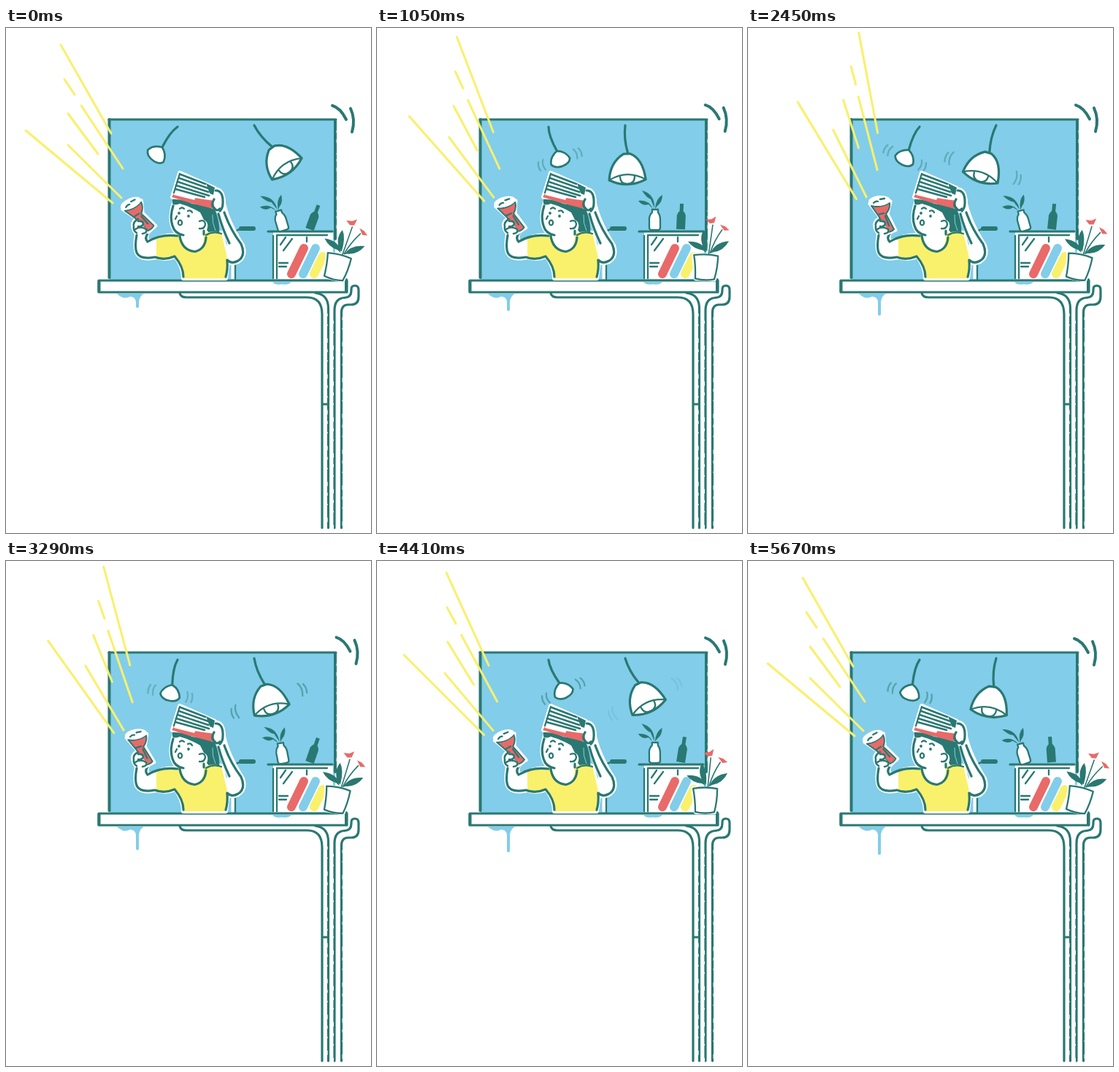
These frames come from a looping animation (500 by 690 pixels, 5.74 s). An HTML page:

```html
<!DOCTYPE html>
<html lang="en">
<head>
<meta charset="utf-8">
<title>Shaking room</title>
<style>
  html, body { margin: 0; width: 100%; height: 100%; overflow: hidden; background: #fff; }
  svg { display: block; width: 500px; height: 690px; }
  .line { fill: none; stroke: #2a7872; stroke-width: 3.2; stroke-linecap: round; stroke-linejoin: round; }
  .thin { stroke-width: 2.3; }
  .bold { stroke-width: 4; }
  .fleck { fill: none; stroke: #fff; stroke-width: 1.2; }
  .paper { fill: #fff; }
  .ink { fill: #2a7872; }
  .red { fill: #e86a69; }
  .blue { fill: #82cdea; }
  .yellow { fill: #f9f16c; }
  .halo { fill: #fff; stroke: #fff; stroke-width: 6; stroke-linejoin: round; }
</style>
</head>
<body>
<svg viewBox="0 0 500 690">
  <defs>
    <path id="leftArm" d="M206 289L194 292Q190 284 196 277L190 262Q176 259 174 268Q174 275 179 281Q176 298 179 307Q184 318 206 313Z"/>
    <path id="rightArm" d="M285 221Q298 219 298 240Q304 266 324 297Q329 312 318 319Q308 324 302 317L306 294Q296 270 291 250Q282 243 285 235Z"/>
    <path id="face" d="M230 239Q224 258 228 270Q232 282 242 283L240 292Q246 306 260 305L272 296L271 281Q278 266 270 244Z"/>
    <path id="shirt" d="M201 291Q218 281 238 284Q241 303 259 305Q272 301 271 281Q282 276 295 280L304 318L301 342H243Q243 326 232 312Q217 318 204 312Z"/>
    <path id="book" d="M238 198L286 219Q288 232 284 246L228 231Z"/>
  </defs>

  <!-- room and pipes -->
  <path class="blue" d="M142 126H451V344H142Z"/>
  <path class="line bold" d="M141.500 341V125M451 126V288"/>
  <path class="line" d="M141 125H452"/>
  <path class="fleck" d="M453.200 140V288" stroke-dasharray="3 9 5 14 2 6"/>
  <path class="line" d="M238 362Q239 368 247 368H412Q433 368 433 391V683M424 362Q441.500 364 441.500 383V683M450 683V386Q450 369 464 368.500Q473 368 473 359V357Q473 352 478 352Q483 352 483 358V367Q483 378 473 378H469Q459.500 378 459.500 389V683M433 514H440"/>
  <path class="fleck" d="M440 390V684M448.400 400V684M461.200 395V684" stroke-dasharray="4 11 2 17 6 9"/>
  <path class="line" d="M127 345H467V361H127Z" style="fill:#fff"/>
  <path class="line bold" d="M127.500 346V360M466 344V360"/>
  <path class="blue" d="M365 347H391Q386 352 378 350Q369 352 365 347Z"/>
  <path class="blue" d="M152 363H189Q183 366 182 374H178Q177 367 170 367Q161 372 152 363Z"/>
  <path id="drip" fill="none" stroke="#82cdea" stroke-linecap="round" stroke-width="4"/>

  <!-- shelf and tap -->
  <path class="paper" d="M366 279H448V343H366Z"/>
  <path class="line" d="M359 278H447"/>
  <path class="line thin" d="M366 284V342M371 342V283H440M376 296L383 286M380 304L392 288M412 286V292M374 321H386M374 326H384"/>
  <g fill="none" stroke-width="12" stroke-linecap="round">
    <path d="M408 301L391 336" stroke="#e86a69"/>
    <path d="M424 301L407 336" stroke="#82cdea"/>
    <path d="M434 312L422 336" stroke="#f9f16c"/>
  </g>
  <path d="M311 322V343" stroke="#fff" stroke-width="5"/>
  <path class="line thin" d="M314 343V279Q315 276 321 275"/>
  <path class="line" d="M322 274H339" style="stroke-width:6"/>

  <g id="bottle"><path class="ink" d="M410 275V256Q411 252 413.500 250V240H418.500V250Q421 252 422 256V275Z"/></g>
  <g id="vase">
    <path class="line thin" d="M373 273V260Q374 254 377 252V248H385V252Q388 256 388 261V273Q388 276 384 276H377Q373 276 373 273Z" style="fill:#fff"/>
    <path class="ink" d="M378 247Q372 234 358 236Q364 244 372 241ZM380 246Q381 227 363 222Q369 232 375 234ZM381 247Q382 233 391 228Q391 238 384 243Z"/>
  </g>

  <g id="lamp1">
    <path class="line" d="M0 0Q-4 12 0 35"/>
    <path class="line" d="M0 35Q-12 40 -13.500 50Q-10 57 0 57Q11 57 13.500 50Q11 39 0 35Z" style="fill:#fff;stroke-width:2.7"/>
    <path id="marks1" class="line thin" d="M-22 40Q-26 46 -23 54M-29 41Q-32 47 -30 53M22 40Q26 46 23 54M29 41Q32 47 30 53"/>
  </g>
  <g id="lamp2">
    <path class="line" d="M0 0Q-3 18 2 38"/>
    <path class="line" d="M-4 39Q-23 50 -25 74Q0 87 25 75Q22 46 5 39Z" style="fill:#fff"/>
    <path class="line thin" d="M-25 74Q0 60 25 75M-10 70Q-10 80 0 80Q10 80 10 70"/>
    <path id="marks2" class="line thin" d="M-45 52Q-50 60 -46 70M-52 55Q-55 61 -53 68M45 52Q50 60 46 70M52 55Q55 61 53 68"/>
  </g>

  <g id="plant">
    <path class="halo" d="M433 311H466L462 343H437Z"/>
    <path class="line thin" d="M433 311Q450 308 466 311Q466 329 462 343Q450 346 436 343Q436 326 433 311Z" style="fill:#fff"/>
    <path class="line" d="M453 309Q455 290 457 269M455 307Q460 290 470 275" style="stroke-width:1.6"/>
    <path class="ink" d="M450 307Q445 291 424 293Q432 303 445 304ZM451 305Q452 285 445 276Q438 288 447 303ZM455 308Q461 292 480 290Q473 304 459 306Z"/>
    <path class="red" d="M447 262L455 261L461 257L459 266L453 267ZM467 268L474 270L480 275L473 276Z"/>
  </g>

  <!-- girl -->
  <g class="halo">
    <use href="#leftArm"/><use href="#rightArm"/><use href="#face"/><use href="#shirt"/><use href="#book"/>
  </g>
  <use href="#face" class="paper"/>
  <path class="ink" d="M228 234Q241 233 255 240Q272 242 286 248Q294 266 292 288Q280 284 275 276Q279 266 271 262L266 252Q250 243 238 240Q231 243 228 240Z"/>
  <path d="M283 255Q282 266 287 277" stroke="#82cdea" fill="none"/>
  <use href="#shirt" class="yellow"/>
  <path class="line" d="M229 243Q224 258 228 270Q231 281 243 283M238 284Q241 304 259 305.500Q273 302 274 286M271 277V282"/>
  <path class="line thin" d="M265 264Q272 261 273 268Q272 275 265 274M238 247Q241 244 244 247M249 250Q253 248 255 252M234 257L232 261M274 283Q284 277 295 281"/>
  <circle class="ink" cx="237" cy="253" r="1.900"/><circle class="ink" cx="250" cy="257" r="1.900"/>
  <ellipse class="line thin" cx="238.500" cy="266" rx="2.600" ry="3.400"/>
  <use href="#leftArm" class="paper"/>
  <path class="line" d="M179 283Q176 299 179 307Q184 317 204 313Q217 318 231 312Q243 326 243 340M195 280Q189 287 194 292Q212 281 235 284"/>
  <path class="line" d="M303 318Q304 330 301 340"/>
  <use href="#book" class="paper"/>
  <path class="red" d="M230 226Q257 233 286 236L284 247Q257 241 227 231Z"/>
  <path class="paper" d="M231 223L260 231L258 235L230 228Z"/>
  <path class="line" d="M239 200L273 213M237 205L277 219M235 210L277 224M233 215L278 229M232 220L272 231" style="stroke-width:2.6"/>
  <path class="line thin" d="M238 199L230 225"/>
  <path class="ink" d="M274 212L286 218L284 228L279 226Z"/>
  <use href="#rightArm" class="paper"/>
  <path class="line" d="M287 222Q298 222 297 240Q297 246 293 250M299 252Q307 275 322 295Q329 311 318 318Q309 323 303 317M291 254Q296 273 306 294M285 234Q280 242 286 247Q289 251 293 247"/>

  <g id="torch">
    <path class="halo" d="M167 240Q180 229 195 237L191 254L202 276L190 281L179 256Z" style="stroke-width:5"/>
    <path class="line red" d="M169 243Q182 246 194 239Q195 247 189 254L200 275Q196 279 190 279L179 257Q174 250 169 243Z" style="fill:#e86a69;stroke-width:2"/>
    <path class="line thin" d="M178 255L186 253M188 257L193 270"/>
    <ellipse class="paper" cx="180" cy="236" rx="15" ry="7" transform="rotate(-5 180 236)"/>
    <path class="line thin" d="M172 239Q175 236 178 237M181 234L187 233"/>
  </g>
  <path class="paper" d="M180 262Q173 265 175 273Q177 283 188 282Q195 280 193 275L188 271L189 266Z"/>
  <path class="line" d="M181 261Q173 265 175 272M181 264Q188 263 188 268Q186 272 181 271M177 275Q184 270 192 275Q194 280 187 281M175 271Q174 277 179 280" style="stroke-width:2.6"/>

  <path id="rays" fill="none" stroke="#f9f06c" stroke-width="3" stroke-linecap="round"
    d="M75 23L144 144M80 70L94 91M103 106L160 192M85 117L126 172M27 140L146 239M85 160L158 232"/>
  <path id="quake" class="line bold" d="M447 106Q458 109 466 125M472 110Q479 125 474 142"/>
</svg>
<script>
const LOOP = 5740, STEP = 70;
const el = id => document.getElementById(id);
const beats = [0, 560, 1540, 2450, 3290, 4410, 5670];

// Smooth curve through values at the given times
function curve(values, times = beats) {
  const last = times.length - 1;
  const slope = i => {
    const a = Math.max(0, i - 1), b = Math.min(last, i + 1);
    return (values[b] - values[a]) / (times[b] - times[a]);
  };
  return t => {
    let i = 0;
    while (i < last - 1 && t > times[i + 1]) i++;
    const d = times[i + 1] - times[i], u = (t - times[i]) / d, v = 1 - u;
    return v * v * (1 + 2 * u) * values[i] + u * u * (3 - 2 * u) * values[i + 1]
      + d * u * v * (v * slope(i) - u * slope(i + 1));
  };
}

const beam = curve([0, .25, .55, .7, .82, 1, .82, .77, .5, .27, .06, 0],
  [0, 560, 1260, 1540, 1890, 2450, 3150, 3290, 3780, 4410, 5040, 5670]);
const swing1 = curve([37, 5, -30, 25, 12, -25, 16]);
const swing2 = curve([-37, -27, 19, 17, -19, -26, 8]);
const bottleTilt = curve([20, 10, -2, 6, 19, 9, -4]);
const quakeShift = curve([0, 4, 1, 2, 5.5, 3, 0]);
const marks1 = curve([0, 0, .7, .4, .35, .5, .5]);
const marks2 = curve([0, 0, 0, .4, .5, .12, 0]);
const dripEnd = curve([380.5, 382.5, 387, 391, 393, 396, 399.5]);

const put = (id, transform) => el(id).setAttribute("transform", transform);
const turn = (id, angle, x, y) => put(id, `rotate(${angle} ${x} ${y})`);
const fade = (id, amount) => { el(id).style.opacity = Math.max(0, amount); };

function draw(now) {
  const t = Math.floor(now % LOOP / STEP) * STEP;
  const phase = t / LOOP * 4 * Math.PI;
  const aim = beam(t);
  turn("rays", 19 * aim, 163, 244);
  turn("torch", 19 * (aim - 1), 186, 265);
  put("lamp1", `translate(235 135) rotate(${swing1(t)})`);
  put("lamp2", `translate(340 133) rotate(${swing2(t)})`);
  fade("marks1", marks1(t));
  fade("marks2", marks2(t));
  turn("bottle", bottleTilt(t), 416, 275);
  turn("vase", -8 - 9 * Math.cos(phase + .35), 383, 276);
  turn("plant", 7 + 7 * Math.cos(phase), 453, 341);
  put("quake", `translate(${quakeShift(t)} ${-quakeShift(t) * .3})`);
  el("drip").setAttribute("d", `M180 366V${dripEnd(t)}`);
  requestAnimationFrame(draw);
}
requestAnimationFrame(draw);
</script>
</body>
</html>
```
